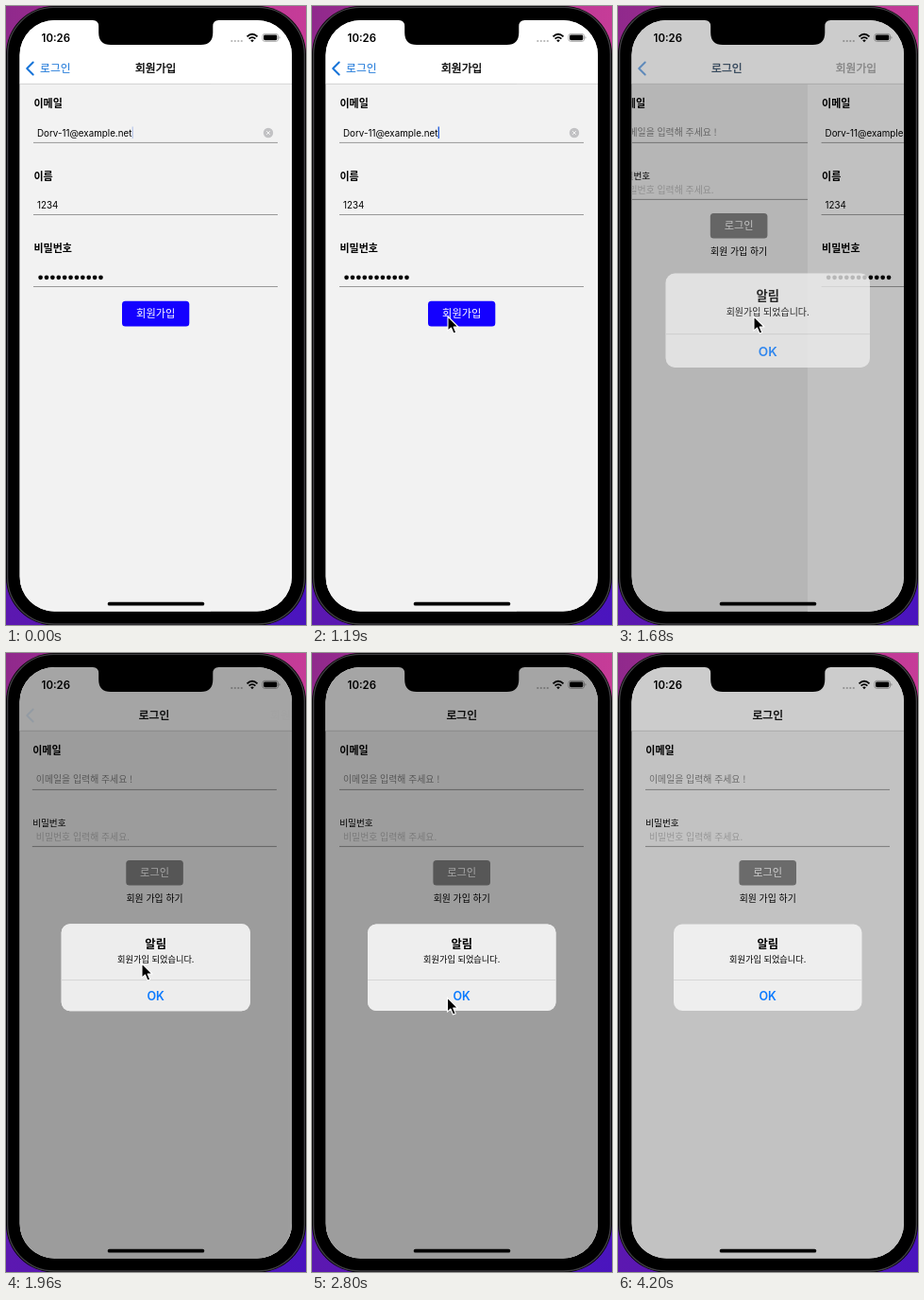
Animation of 318x654 px, one loop 4.27 s. Source, as an HTML page:

```html
<!DOCTYPE html>
<html lang="ko">
<head>
<meta charset="utf-8">
<title>회원가입</title>
<style>
  html, body { margin: 0; width: 100%; height: 100%; overflow: hidden; background: #000; }
  svg { display: block; width: 100%; height: 100%; }
  text { font-family: 'Noto Sans CJK KR', 'Noto Sans CJK', 'Noto Sans CJK JP', sans-serif; font-size: 11px; fill: #000; }
  .latin { font-family: Inter, Roboto, sans-serif; }
  .mid { text-anchor: middle; }
  .bold { font-weight: 700; }
  .nav { font-size: 11.8px; }
  .semi { stroke: #000; stroke-width: .35; }
  .field { font-size: 9.8px; }
  .hint { font-size: 9.9px; fill: #858585; }
  .rule { stroke: #8a8a8a; stroke-width: .85; }
  .btn { font-size: 11.2px; fill: #fff; }
  .blue { fill: #1874d8; }
</style>
</head>
<body>
<svg viewBox="0 0 318 654" preserveAspectRatio="none">
  <defs>
    <linearGradient id="wallTop">
      <stop offset="0" stop-color="#90298c"/><stop offset="1" stop-color="#c63c98"/>
    </linearGradient>
    <linearGradient id="wallBottom">
      <stop offset="0" stop-color="#5c18b0"/><stop offset="1" stop-color="#4a14be"/>
    </linearGradient>
    <clipPath id="screen"><rect x="14.5" y="15" width="288.5" height="624.5" rx="37"/></clipPath>
    <clipPath id="body"><rect x="14.5" y="82.5" width="288.5" height="560"/></clipPath>
    <g id="alert">
      <rect x="59" y="286.5" width="199.5" height="91.5" rx="9" fill="#eeeeee"/>
      <path d="M59 345.5H258.5" stroke="#d2d2d2" stroke-width=".8"/>
      <text class="mid bold" x="158.7" y="312.4" style="font-size:12.3px">알림</text>
      <text class="mid" x="158.7" y="327" style="font-size:9.2px">회원가입 되었습니다.</text>
      <text class="mid latin" x="158.7" y="366.7" style="font-size:12.5px;font-weight:600;fill:#0a7aff">OK</text>
    </g>
  </defs>

  <!-- wallpaper and phone case -->
  <rect width="318" height="327" fill="url(#wallTop)"/>
  <rect y="327" width="318" height="327" fill="url(#wallBottom)"/>
  <rect width="318" height="654.5" rx="51" fill="#000"/>
  <rect x="1.6" y="1.4" width="314.8" height="651.6" rx="49.5" fill="none" stroke="#3f3e42" stroke-width="1.4"/>

  <g clip-path="url(#screen)">
    <rect x="14" y="14" width="290" height="627" fill="#f2f2f2"/>

    <g clip-path="url(#body)">
      <g id="login">
        <rect x="14.5" y="82" width="289" height="560" fill="#f2f2f2"/>
        <text class="bold" x="29.3" y="107">이메일</text>
        <text class="hint" x="33" y="137.3">이메일을 입력해 주세요 !</text>
        <path class="rule" d="M29 144.4H288"/>
        <text x="29.3" y="182.6" style="font-size:9.6px">비밀번호</text>
        <text class="hint" x="33" y="197.6" style="fill:#bcbcbc">비밀번호 입력해 주세요.</text>
        <path class="rule" d="M29 204.4H288"/>
        <rect x="128.4" y="219" width="60.6" height="26.5" rx="3.5" fill="#868686"/>
        <text class="mid btn" x="158.7" y="236.3">로그인</text>
        <text class="mid" x="158.7" y="262.6" style="font-size:9.9px">회원 가입 하기</text>
        <rect id="shade" x="14.5" y="82" width="289" height="560"/>
      </g>

      <g id="signup">
        <rect x="14.5" y="82" width="289" height="560" fill="#f2f2f2"/>
        <text class="bold" x="29.5" y="107">이메일</text>
        <text class="latin field" id="email" x="33" y="137.5">Dorv-11@example.net</text>
        <rect id="caret" y="127.5" width="1.4" height="12.5" fill="#2c62dc"/>
        <g id="clear">
          <circle cx="278" cy="134" r="5.2" fill="#c2c2c4"/>
          <path d="M276.2 132.2l3.6 3.6m0-3.6l-3.6 3.6" stroke="#f6f6f6"/>
        </g>
        <path class="rule" d="M29 144.4H288"/>
        <text class="bold" x="29.5" y="184">이름</text>
        <text class="latin field" x="33" y="213.8">1234</text>
        <path class="rule" d="M29 220.5H288"/>
        <text class="bold" x="29.5" y="260">비밀번호</text>
        <g id="dots"></g>
        <path class="rule" d="M29 296.5H288"/>
        <rect x="123" y="311.7" width="71.3" height="26.8" rx="3.5" fill="#1400ff"/>
        <text class="mid btn" x="158.7" y="329.2">회원가입</text>
      </g>
    </g>

    <!-- navigation and status bars -->
    <rect x="14" y="14" width="290" height="68" fill="#fff"/>
    <path d="M14 82.3H304" stroke="#cfcfcf" stroke-width=".8"/>
    <path id="chevron" d="M28.7 59.5L22.2 66L28.7 72.5" fill="none" stroke="#1874d8" stroke-width="2" stroke-linecap="round" stroke-linejoin="round"/>
    <text id="back" class="mid nav blue" y="70.3">로그인</text>
    <text id="loginTitle" class="mid nav semi" y="70.3">로그인</text>
    <text id="signupTitle" class="mid nav semi" y="70.3">회원가입</text>

    <text class="latin" x="37.6" y="38" style="font-size:11.4px;font-weight:600">10:26</text>
    <g fill="#b4b4b4">
      <circle cx="239.3" cy="37" r="1.1"/><circle cx="242.8" cy="37" r="1.1"/>
      <circle cx="246.3" cy="37" r="1.1"/><circle cx="249.8" cy="37" r="1.1"/>
    </g>
    <g fill="none" stroke="#000" stroke-width="1.8">
      <path d="M255.5 32.3Q261 27.2 266.5 32.3"/>
      <path d="M257.6 34.7Q261 31.6 264.4 34.7"/>
    </g>
    <path d="M259.2 36.3Q261 34.8 262.8 36.3L261 38.2Z"/>
    <rect x="271.9" y="29.4" width="16.6" height="8" rx="2.4" fill="none" stroke="#9a9a9a" stroke-width=".8"/>
    <rect x="273.1" y="30.6" width="14.2" height="5.6" rx="1.4"/>
    <path d="M289.5 32v2.8q1-.4 1-1.4t-1-1.4" fill="#9a9a9a"/>

    <rect id="dimA" x="14" y="14" width="290" height="627"/>
    <rect id="dimB" x="14" y="14" width="290" height="627"/>
    <use id="alertA" href="#alert"/>
    <use id="alertB" href="#alert"/>
    <rect x="107.7" y="629.8" width="102.6" height="3.8" rx="1.9"/>
  </g>
  <path d="M92 14V15Q98.2 15 98.2 21.5V28Q98.2 41 111 41H206.5Q219.3 41 219.3 28V21.5Q219.3 15 225.5 15V14Z"/>

  <path id="pointer" d="M0 0V15.2L3.5 12L6 18L8.7 16.9L6.2 11H11Z" stroke="#fff" stroke-width="1.1" stroke-linejoin="round"/>
</svg>

<script>
const LOOP = 4270, STEP = 70;
const el = id => document.getElementById(id);
const clamp = v => Math.max(0, Math.min(1, v));
const span = (t, a, b) => clamp((t - a) / (b - a));
const smooth = u => u * u * (3 - 2 * u);
const fade = (id, o) => el(id).setAttribute('opacity', o.toFixed(3));
const move = (id, x, y = 0) => el(id).setAttribute('transform', `translate(${x.toFixed(2)} ${y.toFixed(2)})`);

el('dots').innerHTML = Array.from({ length: 11 }, (_, i) =>
  `<circle cx="${(36.6 + i * 6.39).toFixed(2)}" cy="286.8" r="2.35"/>`).join('');
el('caret').setAttribute('x', 33.2 + el('email').getComputedTextLength());

// Pointer stops: [start, end, x, y]
const moves = [
  [490, 1050, 144, 328],
  [2170, 2730, 143.5, 364],
  [2870, 3290, 140, 555],
  [3430, 3640, 139, 668]
];

function pointerAt(t) {
  let x = 139, y = 668;
  for (const [a, b, nx, ny] of moves) {
    const k = smooth(span(t, a, b));
    x += (nx - x) * k;
    y += (ny - y) * k;
  }
  return [x, y];
}

// Critically damped spring for the pop transition
function spring(ms) {
  if (ms <= 0) return 0;
  if (ms > 480) return 1;
  const w = ms * 0.0147;
  return 1 - (1 + w) * Math.exp(-w);
}

function caretAt(t) {
  const u = t % 980;
  return t < 1540 ? Math.min(clamp(0.25 + u / 280), clamp(1 - (u - 490) / 280)) : 0;
}

function draw(time) {
  const t = Math.floor((time % LOOP) / STEP) * STEP;
  const p = spring(t - 1530), rest = 1 - p, shown = p ** 1.5;

  move('signup', 288.5 * p);
  move('login', -86.5 * rest);
  fade('shade', 0.16 * rest);
  fade('caret', caretAt(t));
  fade('clear', t < 1540 ? 1 : 0);

  const tx = 52.4 + 106.3 * p ** 1.2;
  move('back', tx);
  move('loginTitle', tx);
  move('signupTitle', 158.7 + 145 * p);
  fade('back', Math.sqrt(rest));
  fade('loginTitle', shown);
  fade('signupTitle', rest);
  fade('chevron', Math.sqrt(rest));

  // Two stacked alerts appear together; OK dismisses the upper one
  const top = shown * (1 - smooth(span(t, 2730, 3290)));
  const s = 1 + 0.24 * rest;
  for (const [name, o] of [['A', shown], ['B', top]]) {
    fade('dim' + name, 0.2 * o);
    fade('alert' + name, o);
    el('alert' + name).setAttribute('transform',
      `translate(158.7 332.2) scale(${s.toFixed(4)}) translate(-158.7 -332.2)`);
  }
  move('pointer', ...pointerAt(t));
}

const start = performance.now();
function tick() {
  draw(performance.now() - start);
  requestAnimationFrame(tick);
}
tick();
</script>
</body>
</html>
```
